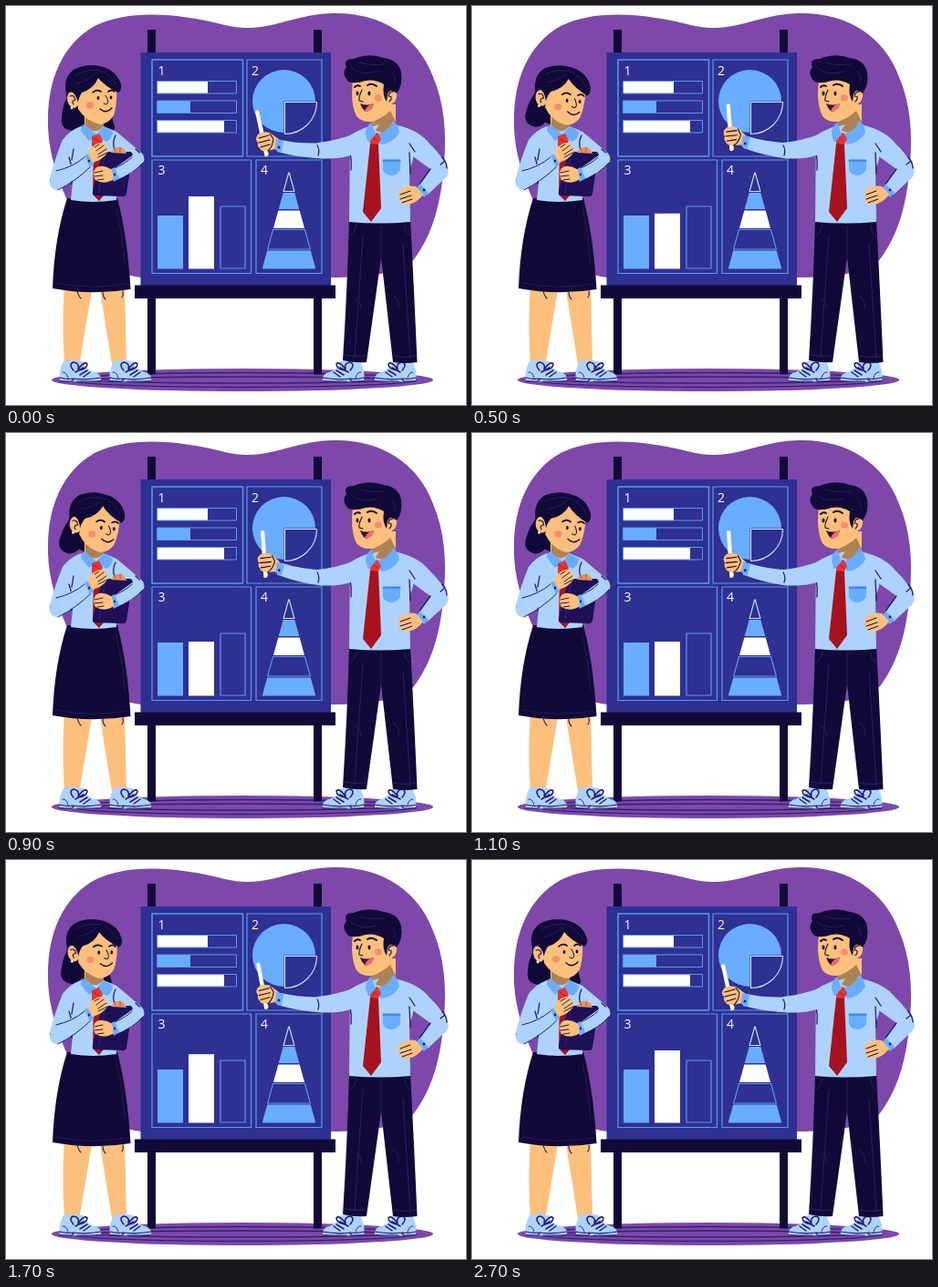
An HTML page with a canvas that plays this animation: 504 px wide and 438 px high, repeating every 2.8 s.

```html
<!DOCTYPE html>
<html lang="en">
<head>
<meta charset="utf-8">
<title>Presentation</title>
<style>
html, body { margin: 0; width: 100%; height: 100%; overflow: hidden; background: #fff; }
canvas { display: block; width: 504px; height: 438px; }
</style>
</head>
<body>
<canvas id="stage"></canvas>
<script>
const W = 504, H = 438, LOOP = 2800;
const INK = '#110938', LINE = '#251a70', PURPLE = '#7d48aa', BOARD = '#2e3092';
const SHIRT = '#add3fd', BLUE = '#69adff', EDGE = '#5c98ee', SKIN = '#fcc07c';
const SHADE = '#ad8355', RED = '#a6131e', BRIGHT = '#e53631', BLUSH = '#f78d70', WHITE = '#fff';

const canvas = document.getElementById('stage');
const ctx = canvas.getContext('2d');
const ratio = window.devicePixelRatio || 1;
canvas.width = W * ratio;
canvas.height = H * ratio;

function fill(d, color) {
  ctx.fillStyle = color;
  ctx.fill(new Path2D(d));
}

function line(d, color = LINE, width = 1.2) {
  ctx.strokeStyle = color;
  ctx.lineWidth = width;
  ctx.lineCap = ctx.lineJoin = 'round';
  ctx.stroke(new Path2D(d));
}

function box(x1, y1, x2, y2, color) {
  ctx.fillStyle = color;
  ctx.fillRect(x1, y1, x2 - x1, y2 - y1);
}

function frame(x1, y1, x2, y2, color = EDGE, width = 1.2) {
  ctx.strokeStyle = color;
  ctx.lineWidth = width;
  ctx.strokeRect(x1, y1, x2 - x1, y2 - y1);
}

function oval(x, y, rx, ry, color, tilt = 0) {
  ctx.fillStyle = color;
  ctx.beginPath();
  ctx.ellipse(x, y, rx, ry, tilt, 0, Math.PI * 2);
  ctx.fill();
}

function turned(x, y, angle, draw) {
  ctx.save();
  ctx.translate(x, y);
  ctx.rotate(angle);
  ctx.translate(-x, -y);
  draw();
  ctx.restore();
}

function ease(x) {
  x = Math.min(1, Math.max(0, x));
  return x < 0.5 ? 4 * x ** 3 : 1 - 4 * (1 - x) ** 3;
}

// 0: looking ahead, 1: head lowered and pointer raised
function pose(t) {
  return ease((t - 200) / 400) - ease((t - 1400) / 480);
}

function backdrop() {
  fill('M46 125C46 80 62 42 97 22C135 3 190 8 240 21C272 29 296 19 322 13C338 9 350 8 362 8C412 8 452 34 468 78C480 106 483 140 480 172C477 215 468 250 447 278C436 292 400 298 356 298H148C112 294 92 268 80 240C66 212 45 170 46 125Z', PURPLE);
  oval(259, 410.5, 209, 12.5, PURPLE);
  ctx.strokeStyle = '#34206f';
  ctx.lineWidth = 1.3;
  for (const [rx, ry] of [[190, 8], [160, 3.5]]) {
    ctx.beginPath();
    ctx.ellipse(259, 410.5, rx, ry, 0, 0, Math.PI * 2);
    ctx.stroke();
  }
}

function barRow(y, end, color) {
  box(166, y, end, y + 13.5, color);
  frame(166, y, 252.5, y + 13.5, EDGE, 1);
}

function slice(y1, y2, color, outline) {
  const half = y => (y - 182) * 0.275;
  const d = `M${310 - half(y1)} ${y1}H${310 + half(y1)}L${310 + half(y2)} ${y2}H${310 - half(y2)}Z`;
  if (color) fill(d, color);
  else line(d, outline, 1.1);
}

function board(p) {
  for (const x of [155, 337]) {
    box(x, 26, x + 9, 54, INK);
    box(x, 318, x + 9, 404.5, INK);
  }
  box(147.5, 51, 356, 307, BOARD);
  box(141, 306.5, 361, 321, INK);

  frame(160, 59, 259.5, 165, EDGE, 1.5);
  frame(264, 59, 346, 165);
  frame(160, 169, 268.5, 293.5);
  frame(274, 169, 346, 293.5);
  ctx.fillStyle = WHITE;
  ctx.font = '14px "Open Sans", "Noto Sans", sans-serif';
  [['1', 166.5, 76], ['2', 269, 76], ['3', 166.5, 185], ['4', 279, 185]]
    .forEach(([s, x, y]) => ctx.fillText(s, x, y));

  barRow(82.5, 221, WHITE);
  barRow(104, 202, BLUE);
  barRow(125.5, 239, WHITE);

  const wedge = 'M305.5 105.5H340.5A35 35 0 0 1 305.5 140.5Z';
  fill('M304.5 104.5H339A34.5 34.5 0 1 0 304.5 139Z', BLUE);
  fill(wedge, BOARD);
  line(wedge, '#d2e2ff', 1.1);

  box(166, 230, 194, 288.5, BLUE);
  box(200, 209 + 20 * p, 228, 288.5, WHITE);
  frame(235, 220, 262, 288);

  slice(183, 203.5, null, '#d2e2ff');
  slice(205, 223, BLUE);
  slice(224.5, 244, WHITE);
  slice(245.5, 267, null, EDGE);
  slice(268.5, 288.5, BLUE);
}

// Toe points right; a flip of -1 points it left
function shoe(x, flip) {
  ctx.save();
  ctx.translate(x, 0);
  ctx.scale(flip, 1);
  fill('M5 390Q13 387 26 390L29 396Q34 401 42 403Q47 406 46 411Q24 414 1 411Q-1 401 5 390Z', SHIRT);
  line('M1 408Q8 410 15 409Q30 411 46 408M1 412H14L16 410M20 412H45', LINE, 1.2);
  line('M16 400Q10 393 16 391Q23 392 21 399Q28 389 31 393Q31 398 22 400M18 402L27 397M23 405L31 400M27 407L34 402', LINE, 1.5);
  line('M4 402Q8 401 10 408', LINE, 0.9);
  ctx.restore();
}

function womanLower() {
  fill('M64 306H95L80.5 393H64Q61 350 64 306Z', SKIN);
  fill('M102 306H130L132 393H116Z', SKIN);
  line('M78 312Q79 318 82 321M106 314Q106 319 109 322M128 313Q129 317 127 320', LINE, 1.1);
  shoe(58, 1);
  shoe(113, 1);
  fill('M67 211H122Q133 252 136.5 311Q94 318 51 310Q53 254 67 211Z', INK);
  line('M55 304Q92 312 133 305M121 222Q128 252 130 283', '#2b2060', 0.8);
}

function womanBackHair(p) {
  turned(94, 110, 0.2 * p, () => {
    fill('M72 92Q62 105 61 122Q59 136 74 137Q87 135 87 112L88 92Z', INK);
    ctx.save();
    ctx.translate(-12 * p, -3 * p);
    fill('M84 105L119 108Q114 121 119 132Q121 138 109 136L83 130Z', INK);
    ctx.restore();
  });
}

function womanBody() {
  fill('M86 112L106 115L107 133Q98 145 86 134Z', SKIN);
  fill('M87 121Q96 130 107 130L107 135Q98 142 87 132Z', SHADE);
  fill('M82 132Q69 137 62 147Q54 166 48 189Q46 200 56 202Q64 199 73 193L71 213Q95 217 121 213L120 196Q138 185 151 171Q153 165 147 160Q132 147 121 138L107 132Q97 143 82 132Z', SHIRT);
  line('M69 166Q74 180 72 195M49 191Q51 200 57 201M74 157L72 169M142 157Q148 162 151 167M120 142Q116 150 119 158', LINE, 1.3);
  fill('M86 130Q82 132 82 137L91 148L99 143L110 149Q117 145 117 138L107 132L99 141Z', BLUE);
  fill('M94 143L102 140L106 148L101 157L94 154Z', BRIGHT);
  fill('M96 153L103 153L107 208L102 214L95 207Z', RED);
  line('M96 145L103 150', RED, 0.8);

  fill('M105 163Q107 160 111 160L136 160Q140 161 138 166L132 206Q131 210 126 209L98 208Q94 208 95 203Z', '#1d1056');
  line('M108 165L102 204', '#3a2a7d', 0.9);
  fill('M115 161Q118 154 124 155Q129 154 132 162Z', '#e9935d');
  line('M119 156L120 160M125 155V160', '#9b4d36', 0.8);

  // arm reaching up from the left elbow
  fill('M52 180Q70 177 87 165L94 174Q76 191 57 202Q46 202 49 188Z', SHIRT);
  line('M57 202Q77 192 93 176M55 181Q73 177 86 166', LINE, 1);
  fill('M86 164L91 162L97 172L92 177Z', BLUE);
  fill('M90 163Q91 155 100 151Q107 148 110 154L112 160Q106 169 95 172Z', SKIN);
  line('M99 159L107 153M101 163L110 157M101 166L111 161M97 155L102 152', INK, 0.9);
  oval(91, 170, 1.2, 1.5, LINE);

  // arm folded back from the right elbow
  fill('M148 161Q154 167 149 173Q137 185 119 192L114 181Q128 172 137 165Z', SHIRT);
  line('M114 180Q130 174 138 166M120 192Q140 184 150 172', LINE, 1);
  fill('M113 180L119 177L124 189L118 193Z', BLUE);
  fill('M116 180Q105 172 98 178Q94 184 98 191Q108 197 118 190Z', SKIN);
  line('M97 183L106 181M97 187L106 186M100 191L107 190M108 176Q104 174 102 175', INK, 0.9);
  oval(119, 185, 1.1, 1.4, LINE);
}

function womanHead(p) {
  turned(94, 123, 0.12 * p, () => {
    fill('M77 84Q85 72 112 76L121 90Q122 108 118 120Q112 130 102 129.5Q87 126 79 113Z', SKIN);
    oval(73.5, 103, 6.3, 9, SKIN, -0.25);
    line('M70 99Q75 97 76 103Q71 104 74 108', INK, 1.1);
    oval(72, 112, 1.4, 1.4, WHITE);
    fill('M66 96Q62 79 74 70Q89 62 107 67Q122 72 126 86Q127 93 123 95Q108 88 101 79Q96 91 83 95Q79 102 79 106Q76 94 70 94Q67 96 66 102Z', INK);
    line('M75 77Q87 68 104 71M78 85Q90 82 98 74M106 72Q116 77 121 86', '#302267', 0.8);
    ctx.save();
    ctx.translate(p, 2 * p);
    line('M95 95Q99 91 104 94M112 94Q116 91 119 94', INK, 1.7);
    oval(101, 101, 1.4, 2.1, INK);
    oval(115, 100.5, 1.4, 2.1, INK);
    line('M109 98Q114 106 110 108L107 107', INK, 1);
    line('M103 113Q110 119 116 112', INK, 1.3);
    oval(92, 109, 4, 3.7, BLUSH);
    ctx.restore();
  });
}

function manLower() {
  shoe(393, -1);
  shoe(450, -1);
  fill('M376 233H443Q447 310 450.5 391Q437 393 424 391L411 276L395 391Q382 392 369 389Q374 310 376 233Z', INK);
  line('M411 242V276M384 240Q382 249 377 252M437 241Q437 250 443 252M391 252L382 384M435 262L443 386M383 322Q390 326 389 333M424 318Q432 322 430 332M371 383Q383 386 394 384M425 384Q437 387 449 384', '#30236d', 0.9);
}

function manBody() {
  fill('M408 129Q391 133 377 142L376 237Q409 240 443 237L442 178Q450 166 444 144L428 130Z', SHIRT);
  fill('M430 131Q453 137 464 151Q477 163 484.5 179Q486 187 478 192L462 207L452 197L465 179L443 163Z', SHIRT);
  line('M442 161L443 184M465 179L452 197M478 166Q483 172 483 178M476 174L481 170M442 151L448 160M377 161Q379 170 378 180', LINE, 1.3);
  fill('M453 195L463 205L458 210L449 202Z', BLUE);
  oval(458, 202, 1.4, 1.4, LINE);
  fill('M449 198L457 207Q450 217 439 218Q433 218 433 214Q428 211 431 207Q429 203 433 201Q440 196 449 198Z', SKIN);
  line('M432 207L443 203M432 212L444 208M434 216L445 212', INK, 1);
  fill('M413 168H432V180Q427 187 421 186Q415 185 413 180Z', BLUE);
  line('M413 170H432', '#286ab8', 1.2);

  fill('M401 108H427V133Q417 145 400 134Z', SKIN);
  fill('M400 126Q412 124 421 115L427 127V134Q415 144 400 134Z', SHADE);
  fill('M424 126Q419 139 405 141L411 152Q424 151 431 139Q430 131 424 126Z', BLUE);
  fill('M399 142L407 139L411 146L407 154L399 152Z', BRIGHT);
  fill('M399 151L408 152L411 222L400 237L391 226Z', RED);
  line('M400 143L407 148', RED, 0.8);
}

function manHead() {
  fill('M380 78Q400 69 422 80L424 105Q418 121 403 126.5Q391 129 384 121Q379 111 379 96Z', SKIN);
  oval(422, 99, 6, 9, SKIN, 0.2);
  line('M425 94Q420 93 419 99Q425 99 420 105', INK, 1.1);
  fill('M375 83Q367 74 373 67Q369 58 381 58Q398 51 414 57Q430 59 433 73Q435 87 428 96Q421 89 418 97L417 105Q412 98 414 86Q404 80 394 82Q382 86 375 83Z', INK);
  line('M378 68Q388 77 407 72M387 62Q400 66 415 64M422 72Q427 78 426 84', '#302267', 0.8);
  line('M382 89Q385 86 388 88M396 87Q401 84 406 88', INK, 2);
  oval(385, 96, 1.5, 2.4, INK);
  oval(398, 96, 1.5, 2.4, INK);
  line('M390 92Q386 101 387 104L391 105', INK, 1.1);
  fill('M388 107Q395 110 403 107Q401 115 394 116Q390 113 388 107Z', '#35133f');
  fill('M393 115Q396 108 403 107Q402 115 394 116Z', '#f3696a');
  oval(408, 101, 4, 3.8, BLUSH);
}

function pointingArm(p) {
  fill('M409 130Q393 134 380 141Q361 148 341 150L343 167Q363 169 381 163L398 147Z', SHIRT);
  turned(345, 156, 0.095 * p, () => {
    fill('M349 150Q324 152 301 147L297 160Q323 167 348 167.5Z', SHIRT);
    turned(297, 152, 0.05 * p, () => {
      fill('M273 116Q274.5 113 277 115L287.5 163Q287 166 283.5 165Z', WHITE);
      line('M277 116L287.5 163', '#d9d4e5', 0.7);
      fill('M300 147L289 139Q280 137 276 141Q272 146 276 150Q275 154 278 156Q279 160 287 159L299 156Z', SKIN);
      line('M277 145L288 142M277 150L289 147M279 155L289 152M289 140L293 146Q292 155 287 159', INK, 1.1);
    });
    fill('M296 146L304 148L302 161L295 158Z', BLUE);
    oval(299, 155, 1.4, 1.5, LINE);
  });
  line('M341 153Q344 158 342 164', LINE, 1.3);
}

function draw(t) {
  const p = pose(t);
  ctx.setTransform(ratio, 0, 0, ratio, 0, 0);
  box(0, 0, W, H, WHITE);
  backdrop();
  board(p);
  womanLower();
  womanBackHair(p);
  womanBody();
  womanHead(p);
  manLower();
  manBody();
  pointingArm(p);
  // near collar flap lies over the sleeve
  fill('M400 128Q394 132 394 141L397 150L405 141Z', BLUE);
  manHead();
}

const start = performance.now();
function tick() {
  const t = (performance.now() - start) % LOOP;
  draw(Math.floor(t / 100) * 100);
  requestAnimationFrame(tick);
}
draw(0);
requestAnimationFrame(tick);
</script>
</body>
</html>
```
